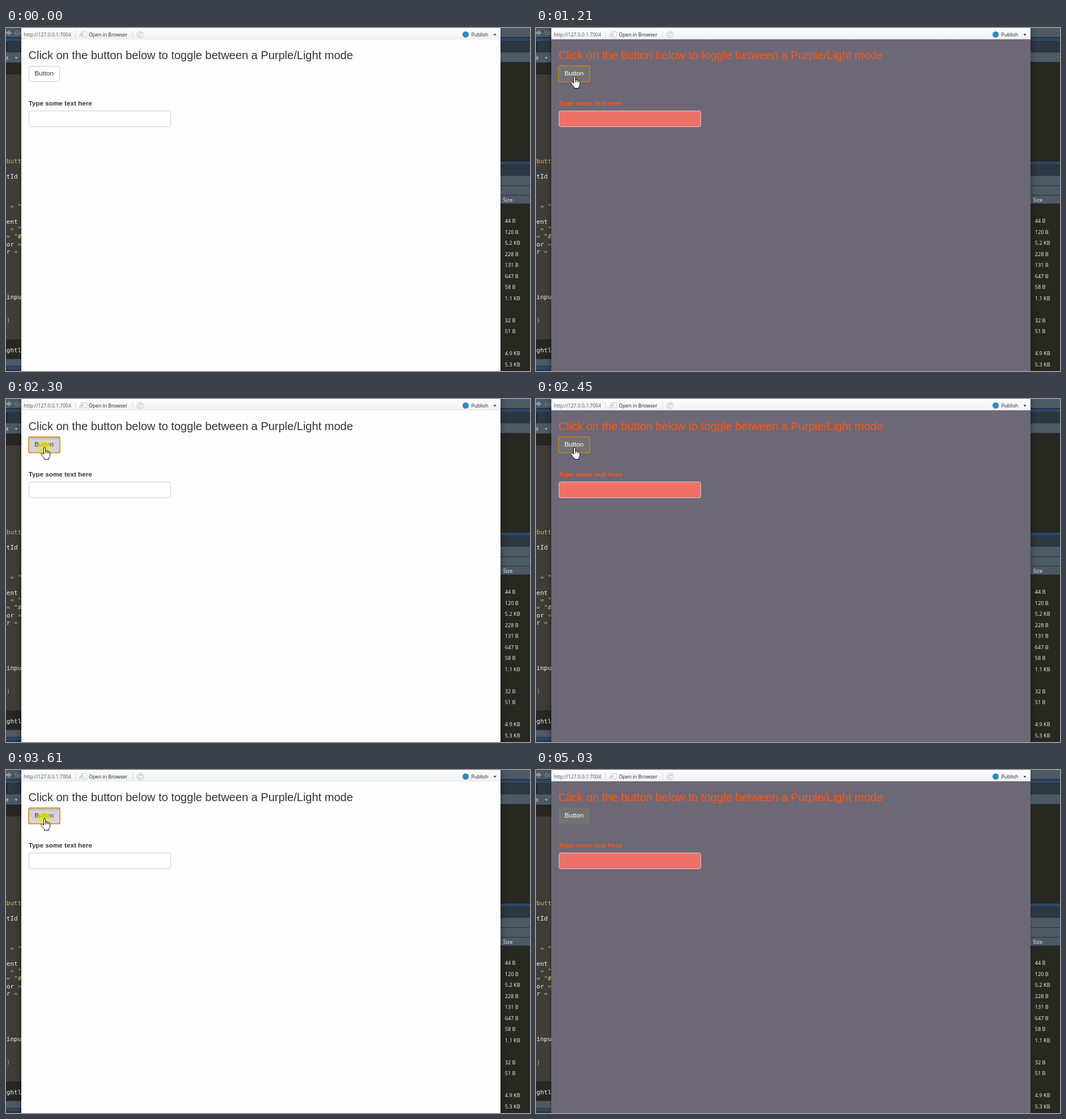
An HTML page that plays this animation: 924x606 px, repeating every 5.1 s.

```html
<!DOCTYPE html>
<html lang="en">
<head>
<meta charset="utf-8">
<title>Purple/Light mode toggle</title>
<style>
html, body { margin: 0; width: 100%; height: 100%; overflow: hidden; background: #272822; }
svg { display: block; }
text { white-space: pre; }
.code { font: 11px "DejaVu Sans Mono", monospace; }
.ui { font: 9.2px "Open Sans", sans-serif; fill: #f4f4f4; }
.bar { font: 8.7px "Open Sans", sans-serif; fill: #222; }
.page { font: 11.67px "Liberation Sans", Arial, sans-serif; }

#win { filter: drop-shadow(0 0 2px rgba(0,0,0,.35)); }
.active #win { filter: drop-shadow(0 1px 6px rgba(0,0,0,.45)); }
#paper { fill: #fefefe; }
.ink { fill: #333; }
#btn { fill: #fff; stroke: #ccc; }
#label { fill: #333; }
#field { fill: #fff; stroke: #ccc; }
#ring, #inset, #spot, #hand, #arrow { display: none; }

.hover #btn { fill: #e6e6e6; stroke: #adadad; }
.press #btn { fill: #d4d4d4; stroke: #8c8c8c; }
.press #inset { display: inline; }
.focus #ring { display: inline; }
.click #spot { display: inline; }
.hand #hand, .arrow #arrow { display: inline; }

.dark #paper { fill: #6d6875; }
.dark .ink { fill: #ff5714; }
.dark #btn { fill: #737373; stroke: #737373; }
.dark #label { fill: #fff; }
.dark #field { fill: #ef7067; stroke: #d6d0d0; }
.dark #ring { stroke: #b07f2b; }
</style>
</head>
<body>
<svg id="stage" width="924" height="606" viewBox="0 0 924 606">
  <defs>
    <linearGradient id="chrome" x2="0" y2="1">
      <stop offset="0" stop-color="#fcfdfd"/><stop offset="1" stop-color="#eff2f4"/>
    </linearGradient>
    <linearGradient id="shade" x2="0" y2="1">
      <stop offset="0" stop-opacity=".14"/><stop offset="1" stop-opacity="0"/>
    </linearGradient>
  </defs>

  <g id="back"></g>
  <path d="M0 6.5h4V3.5l6 5-6 5v-3H0z" fill="#8b97a3"/>
  <path d="M15.5 51.5h5l-2.5 3z" fill="#c3cad0"/>

  <rect id="win" x="27" y="-30" width="845" height="660" fill="#fff"/>
  <rect x="27" width="845" height="20" fill="url(#chrome)"/>
  <path d="M27 19.5h845" stroke="#e3e7ea"/>
  <path d="M122.5 5v13M223.5 5v13" stroke="#d3d8dc"/>
  <g class="bar">
    <text x="31.5" y="15" style="font-size:8.55px;fill:#555">http://127.0.0.1:7004</text>
    <text x="146" y="15">Open in Browser</text>
    <text x="820.5" y="15">Publish</text>
  </g>
  <g fill="#f7f9fa" stroke="#c3cbd1">
    <rect x="132.5" y="6.5" width="10" height="9" rx="1"/>
    <path d="M129.5 15.5l1-4 4-1.5v-1.500l3 2.500-3 2.500v-1.500q-3 .5-5 3.500z" fill="#dfe5e9"/>
  </g>
  <g fill="none" stroke="#c2c6c9">
    <circle cx="236.500" cy="11.500" r="6"/>
    <path d="M239 13.300a3.100 3.100 0 1 1-.2-4M239.500 7.500v2.500h-2.500" stroke-width="1.200"/>
  </g>
  <circle cx="810.500" cy="11.500" r="5.500" fill="#2c8ac6"/>
  <path d="M859.500 10.500h5l-2.500 3z" fill="#222"/>

  <rect id="paper" x="27" y="20" width="845" height="586"/>
  <g class="page">
    <text class="ink" x="39.500" y="54.500" style="font-size:20.050px">Click on the button below to toggle between a Purple/Light mode</text>
    <rect id="btn" x="40.500" y="67.500" width="54" height="27" rx="3"/>
    <rect id="inset" x="41" y="68" width="53" height="5" fill="url(#shade)"/>
    <rect id="ring" x="40" y="67" width="55" height="28" rx="2" fill="none" stroke="#dea038" stroke-width="2"/>
    <text id="label" x="50.200" y="83.500">Button</text>
    <text class="ink" x="39.800" y="137" font-weight="bold">Type some text here</text>
    <rect id="field" x="40.500" y="146.500" width="250" height="28" rx="3"/>
  </g>

  <circle id="spot" cx="67" cy="85.500" r="11" fill="#ebeb00" fill-opacity=".65"/>
  <g id="cursor" fill="#fff" stroke="#111" stroke-linejoin="round">
    <path id="arrow" d="M.5.5v16l3.700-3.500 2.400 5.500 2.400-1-2.400-5.400h5.200z"/>
    <g id="hand" transform="translate(-6 0)">
      <path d="M5.500 12.500V2Q5.500.5 7 .5T8.500 2V7.500Q8.500 6 10 6 11.300 6 11.300 8 11.500 6.700 12.800 6.800 14 7 14 8.800 14.200 7.800 15.300 8 16.500 8.300 16.500 10V14Q16.500 17 14.500 19V21.500H6.500V19.500Q3 16 .9 12.500.2 11 1.500 10.400 2.800 10.200 4 11.500z"/>
      <path d="M8.500 7v4M11.300 8v3M14 9v2.500" fill="none"/>
    </g>
  </g>
</svg>

<script>
const LOOP = 5100;
const stage = document.getElementById('stage');
const cursor = document.getElementById('cursor');
const back = document.getElementById('back');

function add(tag, attrs, text) {
  const el = document.createElementNS(stage.namespaceURI, tag);
  for (const key in attrs) el.setAttribute(key, attrs[key]);
  if (text) el.textContent = text;
  back.appendChild(el);
}

// Stacked bands: [top, colour], each reaching down to the next
function bands(x, width, list) {
  list.forEach(([y, fill], i) => {
    const end = i + 1 < list.length ? list[i + 1][0] : 606;
    add('rect', { x, y, width, height: end - y, fill });
  });
}

const BAR = '#4d5965', TAB = '#2d3741', BLUE = '#2b486b', EDIT = '#272822', LINE = '#27313a';
bands(0, 40, [
  [0, BAR], [16, LINE], [18, BLUE], [23, LINE], [24, TAB], [42, LINE], [43, BAR],
  [61, EDIT], [82, '#3e3d37'], [550, EDIT], [584, LINE], [585, BAR], [597, LINE], [598, BLUE], [603, TAB]
]);
bands(860, 64, [
  [0, BAR], [16, LINE], [18, BLUE], [23, LINE], [24, TAB], [42, LINE], [43, BAR], [60, EDIT],
  [236, BLUE], [241, LINE], [242, TAB], [260, LINE], [261, BAR], [278, LINE], [279, BAR],
  [295, LINE], [296, BAR], [310, LINE], [311, EDIT]
]);
add('rect', { x: 0, y: 24, width: 3, height: 18, fill: '#222a31' });

add('text', { x: 15, y: 12, class: 'ui', style: 'fill:#98a3ad' }, 'Go');
add('text', { x: -1, y: 56, class: 'ui' }, 'it');

// Visible ends of the code lines: baseline, column, colour, text
const WHITE = '#f5f5f0', GOLD = '#e5b567', GREY = '#a9a79c', STR = '#d9c77e';
[
  [239, 0, GOLD, 'butt'], [266, -1, WHITE, 'utId'],
  [319, -1, GOLD, 'd'], [319, 1, GREY, '='], [319, 3, STR, '"'],
  [346, 0, WHITE, 'ent'], [346, 3, GREY, ' ='],
  [359, 1, GREY, '='], [359, 3, STR, '"'],
  [372, 0, GREY, '='], [372, 2, STR, '"#'],
  [386, 0, WHITE, 'or'], [386, 3, GREY, '='],
  [399, 0, WHITE, 'r'], [399, 2, GREY, '='],
  [479, -1, GREY, '('], [479, 0, WHITE, 'inpu'],
  [520, 0, GREY, ')'], [573, 0, WHITE, 'ghtl']
].forEach(([y, col, fill, text]) => {
  const weight = fill === WHITE ? 'bold' : 'normal';
  add('text', { x: .8 + col * 6.62, y, class: 'code', fill, 'font-weight': weight }, text);
});

add('text', { x: 876.5, y: 307, class: 'ui' }, 'Size');
['44 B', '120 B', '5.2 KB', '228 B', '131 B', '647 B', '58 B', '1.1 KB', '', '32 B', '51 B', '', '4.9 KB', '5.3 KB']
  .forEach((size, i) => size && add('text', { x: 879.7, y: 344 + i * 19.5, class: 'ui' }, size));

// [start ms, state classes, pointer x, pointer y]
const OVER = 'active hand hover focus';
const NIGHT = 'active hand dark focus';
const STEPS = [
  [0, ''],
  [130, 'arrow', 696, 556],
  [210, 'arrow', 486, 428],
  [290, 'arrow', 290, 308],
  [370, 'arrow', 183, 242],
  [600, 'arrow', 165, 216],
  [680, 'arrow', 130, 168],
  [750, 'arrow', 96, 120],
  [830, 'hand hover', 75, 93],
  [910, 'hand hover', 69, 87],
  [990, 'hand hover', 67, 85],
  [1060, 'active hand hover click', 67, 85],
  [1130, OVER + ' press click', 67, 85],
  [1210, NIGHT, 67, 85],
  [1670, NIGHT + ' click', 67, 85],
  [1840, OVER, 67, 85],
  [2300, OVER + ' press click', 67, 85],
  [2450, NIGHT, 67, 85],
  [3080, NIGHT + ' click', 67, 85],
  [3230, OVER, 67, 85],
  [3610, OVER + ' press click', 67, 85],
  [3780, NIGHT, 67, 85],
  [4010, 'active arrow dark focus', 277, 198],
  [4080, 'active dark focus'],
  [5030, 'dark']
];

let shown;
function draw(now) {
  const t = now % LOOP;
  const step = STEPS.findLast(s => s[0] <= t);
  if (step !== shown) {
    shown = step;
    const [, state, x = 0, y = 0] = step;
    stage.setAttribute('class', state);
    cursor.setAttribute('transform', `translate(${x} ${y})`);
  }
}

const start = performance.now();
function tick() {
  draw(performance.now() - start);
  requestAnimationFrame(tick);
}
tick();
</script>
</body>
</html>
```
